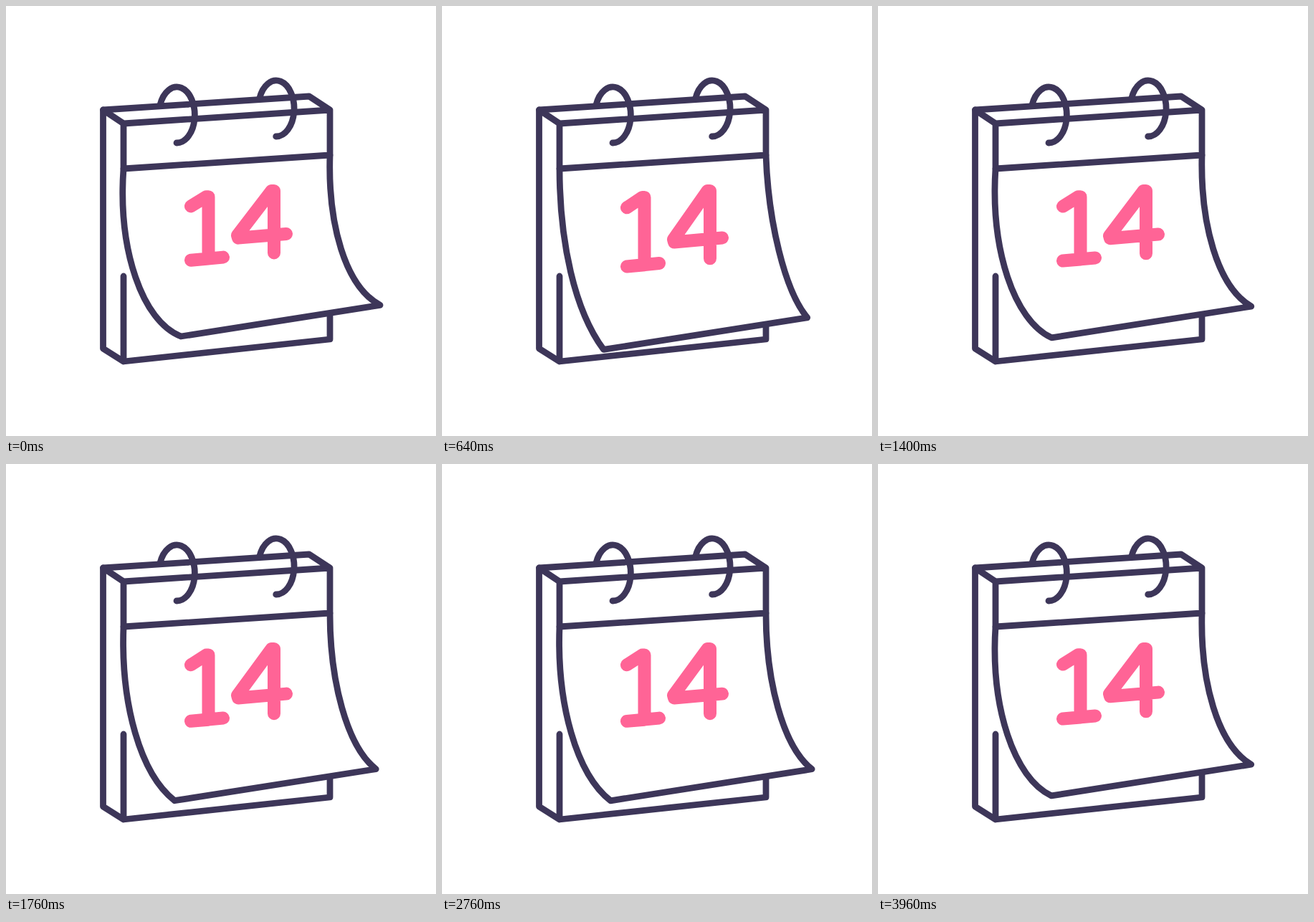
Animation, 600 px wide and 600 px high, one loop 4000 ms. Source, as an HTML page:

```html
<!DOCTYPE html>
<html lang="en">
<head>
<meta charset="utf-8">
<title>Calendar</title>
<style>
  html, body { margin: 0; width: 100%; height: 100%; overflow: hidden; background: #fff; }
  svg { display: block; width: 100vw; height: 100vh; }
  path { fill: none; stroke-linecap: round; stroke-linejoin: round; }
  .ink { stroke: #3d3659; stroke-width: 8.8; }
  .digit { stroke: #ff6496; stroke-width: 18; }
  #page { fill: #fff; }
</style>
</head>
<body>
<svg viewBox="0 0 600 600">
  <path class="ink" d="M135.5 145V478L164 496L452 465V380M164 377V496"/>
  <path class="ink" id="page"/>
  <path class="ink" d="M135.5 145L423 126L452 145L164 164ZM164 164V227L452 208V145"/>
  <path class="ink" d="M215 138A25 39 0 1 1 238 191M353.7 129A25 39 0 1 1 376.7 182"/>
  <path class="digit" id="one"/>
  <path class="digit" id="four"/>
</svg>
<script>
  const LOOP = 4000, STEP = 40;

  // The page rests briefly, then swings between these corner heights at an even pace.
  const REST = 70, HALF_SWING = 530;
  const turns = [461, 479.8, 454.2, 471, 456, 470, 457.2, 465, 457];

  const $ = id => document.getElementById(id);
  const mix = (a, b, k) => a + (b - a) * k;
  const ease = k => (1 - Math.cos(Math.PI * k)) / 2;

  function cornerHeight(t) {
    const phase = Math.max(0, (t - REST) / HALF_SWING);
    const i = Math.floor(phase);
    return mix(turns[i], turns[i + 1], ease(phase - i));
  }

  // The corner moves diagonally until the paper is fully curled.
  function pagePath(y) {
    const k = (y - 461) / 18;
    const x = Math.min(248, 705 - y);
    const tipX = x + 278 + 6 * Math.max(0, k);
    const tipY = y - 43.6 - k;
    const left = [mix(156, 164, k), mix(340, 330, k), mix(190, 185, k), mix(440, 425, k)];
    const right = [mix(473, 478, k), mix(391, 397, k), mix(449, 455, k), mix(304, 300, k)];
    return `M164 227C${left} ${x} ${y}L${tipX} ${tipY}C${right} 452 208`;
  }

  // Digits stretch downwards from their top edge.
  function digitPath(points, stretch) {
    return "M" + points.map(([x, y]) => `${x} ${258 + (y - 258) * stretch}`).join("L");
  }

  const one = [[258, 279], [279.5, 266], [282.5, 266], [282.5, 351], [258, 353], [303, 349]];
  const four = [[374, 343], [374, 258], [370.5, 258], [323, 319], [324, 322.5], [391, 317]];

  function draw(t) {
    const y = cornerHeight(t);
    const stretch = 1 + (y - 457.5) / 200;
    $("page").setAttribute("d", pagePath(y));
    $("one").setAttribute("d", digitPath(one, stretch));
    $("four").setAttribute("d", digitPath(four, stretch));
  }

  let start;
  function tick(now) {
    start ??= now;
    draw(Math.floor((now - start) % LOOP / STEP) * STEP);
    requestAnimationFrame(tick);
  }
  draw(0);
  requestAnimationFrame(tick);
</script>
</body>
</html>
```
